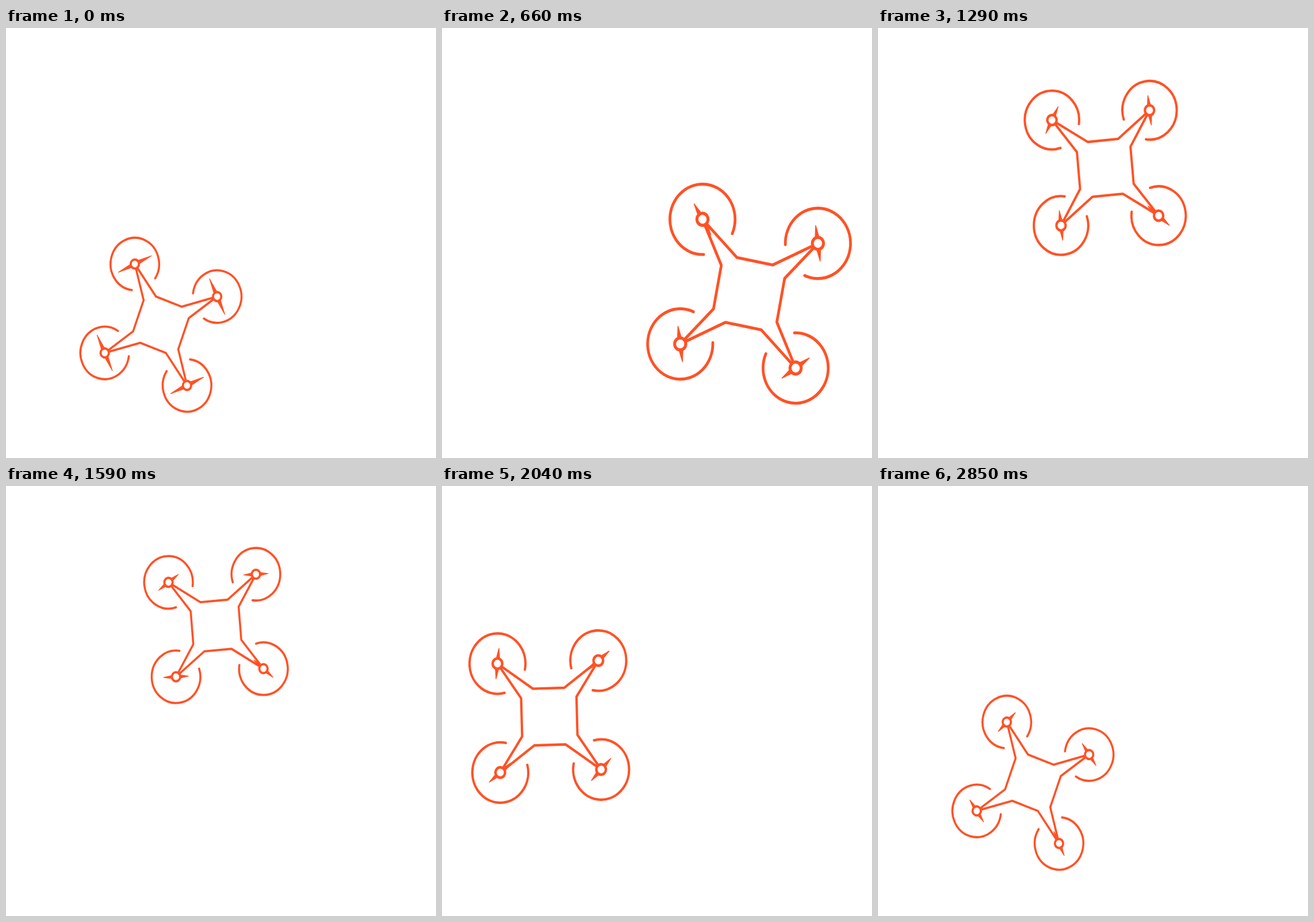
An HTML page for the animation above (2880 ms loop, 748 by 748 pixels).

```html
<!DOCTYPE html>
<html lang="en">
<head>
<meta charset="utf-8">
<title>Drone flight</title>
<style>
  html, body { margin: 0; width: 100%; height: 100%; overflow: hidden; background: #fff; }
  svg { display: block; width: 100vw; height: 100vh; }
  .line { fill: none; stroke: #ff5226; stroke-width: 3.3; stroke-linecap: round; stroke-linejoin: round; }
  .hub { fill: #fff; stroke: #ff5226; stroke-width: 3.5; }
  .blade { fill: #ff5226; stroke: #ff5226; stroke-width: 1; stroke-linejoin: round; }
</style>
</head>
<body>
<svg viewBox="0 0 748 748">
  <g id="drone">
    <path class="line" d="M-70.7-70.7L-22-36.8L22-36.8L70.7-70.7L38.8-24.8V24.8L70.7 70.7L22 36.8H-22L-70.7 70.7L-38.8 24.8V-24.8Z"/>
  </g>
</svg>
<script>
const LOOP = 2880, STEP = 30, STRETCH = 1.08;
const NS = 'http://www.w3.org/2000/svg';
const drone = document.getElementById('drone');

function make(tag, attrs) {
  const el = document.createElementNS(NS, tag);
  for (const k in attrs) el.setAttribute(k, attrs[k]);
  return el;
}
const add = (parent, tag, attrs) => parent.appendChild(make(tag, attrs));

// Flight path: four eased legs around an oval.
const legs = [
  [0, 792, 'M269.5 516.2C354 496 509.5 513 536.5 458'],
  [792, 1460, 'M536.5 458C540 390 424 253 384.8 237.5'],
  [1460, 2130, 'M384.8 237.5C340 242 206 334 185.8 403.8'],
  [2130, 2850, 'M185.8 403.8C183 450 239.7 500.6 269.5 516.2']
].map(([start, end, d]) => {
  const path = make('path', { d });
  return { start, end, path, length: path.getTotalLength() };
});

// cubic-bezier(.5, 0, .2, 1)
function ease(x) {
  let lo = 0, hi = 1;
  for (let i = 0; i < 24; i++) {
    const u = (lo + hi) / 2, v = 1 - u;
    if (1.5 * v * v * u + .6 * v * u * u + u * u * u < x) lo = u; else hi = u;
  }
  return lo * lo * (3 - 2 * lo);
}

function place(t) {
  const leg = legs.find(l => t < l.end) || legs[3];
  const p = Math.min(1, (t - leg.start) / (leg.end - leg.start));
  return leg.path.getPointAtLength(ease(p) * leg.length);
}

// Smooth step from 0 to 1 between two times.
function ramp(t, start, end) {
  const u = Math.min(1, Math.max(0, (t - start) / (end - start)));
  return u * u * (3 - 2 * u);
}

// The drone grows on the right, and again, less, on the left.
const size = t => 107.8
  + 36.8 * (ramp(t, 0, 560) - ramp(t, 970, 1500))
  + 23.8 * (ramp(t, 1555, 2331) - ramp(t, 2340, 2800));

const tilt = t => 20.1
  - 25.4 * ramp(t, 265, 1237)
  + 3.9 * ramp(t, 1460, 2130)
  + 21.5 * ramp(t, 2136, 2850);

// Blades flicker in length every three steps.
const reach = t => 23.1 + 6.3 * Math.cos(2 * Math.PI * t / (3 * STEP));

// One rotor per corner, each with its own half turns per loop.
const rotors = [11, 5, 48, 5].map((turns, i) => {
  const g = add(drone, 'g', { transform: `rotate(${45 + 90 * i}) translate(-100)` });
  const gap = 32 * Math.PI / 180, r = 39.2;
  const x = r * Math.cos(gap), y = r * Math.sin(gap);
  add(g, 'path', { class: 'line', d: `M${x} ${y}A${r} ${r} 0 1 1 ${x} ${-y}` });
  const blade = add(g, 'path', { class: 'blade' });
  add(g, 'circle', { class: 'hub', r: 6.7 });
  return { turns, blade };
});

function draw(ms) {
  const t = Math.floor(ms % LOOP / STEP) * STEP;
  const p = place(t), s = size(t) / 100, len = reach(t);
  drone.setAttribute('transform',
    `translate(${p.x} ${p.y}) scale(${s} ${s * STRETCH}) rotate(${tilt(t)})`);
  for (const { turns, blade } of rotors) {
    blade.setAttribute('d', `M0-3.5L${len} 0L0 3.5L${-len} 0Z`);
    blade.setAttribute('transform', `rotate(${90 + 180 * turns * t / LOOP})`);
  }
}

const begin = performance.now();
function tick() {
  draw(performance.now() - begin);
  requestAnimationFrame(tick);
}
tick();
</script>
</body>
</html>
```
